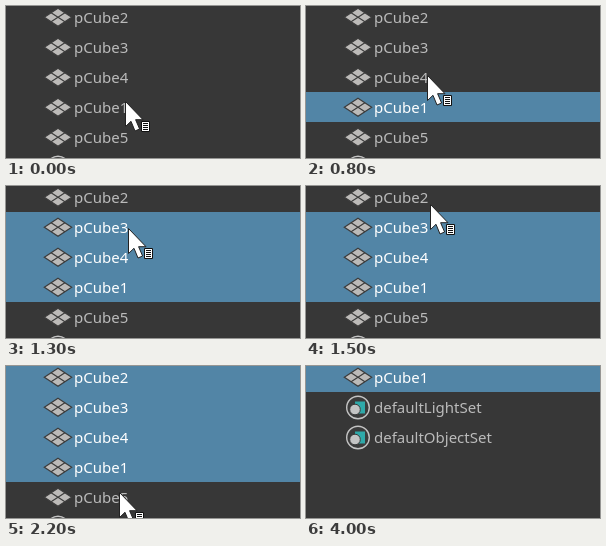
An HTML page that plays this animation: 294 by 152 pixels, repeating every 5800 ms.

```html
<!DOCTYPE html>
<html lang="en">
<head>
<meta charset="utf-8">
<title>Outliner selection</title>
<style>
html, body { margin: 0; width: 100%; height: 100%; overflow: hidden; background: #373737; }
svg { display: block; width: 100%; height: 100%; }
text { font: 15px "Noto Sans", "Open Sans", sans-serif; fill: #bbb; }
.bar { fill: none; }
.on .bar { fill: #5285a6; }
.on text { fill: #fff; }
</style>
</head>
<body>
<svg viewBox="0 0 294 152">
  <defs>
    <g id="mesh" stroke="#3c3c3c" stroke-width="1.2">
      <path d="M52 2.3L65.7 11.3L52 20.3L38.3 11.3Z" fill="#bcbab8"/>
      <path d="M45.1 6.8L58.9 15.8M58.9 6.8L45.1 15.8"/>
    </g>
    <g id="set">
      <circle cx="52" cy="11.5" r="11.3" fill="#3b3b3b" stroke="#c4c4c4" stroke-width="1.4"/>
      <path d="M49 5.5h10v12h-10z" fill="#2fa9a9"/>
      <circle cx="49" cy="13.5" r="5.3" fill="#c4c4c4" stroke="#3b3b3b"/>
    </g>
  </defs>
  <g id="list"></g>
  <g id="cursor">
    <path d="M.5 .5V25.5L6 20.3L10 30L14.6 28L10.6 18.7H18Z" fill="#fff" stroke="#222"/>
    <path d="M16.5 20.5h8v10h-8z" fill="#fff" stroke="#111"/>
    <path d="M18 22.5h5M18 24.5h5M18 26.5h5M18 28.5h5" stroke="#111"/>
  </g>
</svg>
<script>
const LOOP = 5800, SCROLL = 4000, STEP = 100;
const list = document.getElementById("list");
const cursor = document.getElementById("cursor");

// The pointer travels to each stop, then clicks to select a cube.
const stops = [
  { x: 116, y: 94, travel: 200, click: 400, cube: "pCube1" },
  { x: 121, y: 69, travel: 400, click: 900, cube: "pCube4" },
  { x: 122, y: 42, travel: 200, click: 1300, cube: "pCube3" },
  { x: 124, y: 18, travel: 200, click: 1800, cube: "pCube2" },
  { x: 113, y: 126, travel: 400, click: 2300, cube: "pCube5" },
  { x: 225, y: 162, travel: 200, click: 2500 }
];
const start = { x: 119, y: 95, click: 0 };

const cubes = [..."23415"].map(n => "pCube" + n);
const before = [...cubes, ""];
const after = ["pCube1", "defaultLightSet", "defaultObjectSet"];

const selected = (label, t) => stops.some(s => s.cube === label && t >= s.click);

const row = (label, i, t) =>
  `<g transform="translate(0 ${i * 30})" class="${selected(label, t) ? "on" : ""}">
    <rect class="bar" y="-4" width="294" height="30"/>
    <use href="#${cubes.includes(label) ? "mesh" : "set"}"/>
    <text x="68" y="17">${label}</text></g>`;

function moveCursor(t) {
  const n = stops.findIndex(s => t < s.click);
  cursor.style.display = n < 0 ? "none" : "";
  if (n < 0) return;
  const from = stops[n - 1] || start, to = stops[n];
  const k = Math.min(1, (t - from.click) / to.travel);
  const mix = axis => Math.round(from[axis] + (to[axis] - from[axis]) * k);
  cursor.setAttribute("transform", `translate(${mix("x")} ${mix("y")})`);
}

let shown = -1;
function draw(now) {
  const t = Math.floor(now % LOOP / STEP) * STEP;
  if (t !== shown) {
    shown = t;
    const rows = t < SCROLL ? before : after;
    list.innerHTML = rows.map((label, i) => row(label, i, t)).join("");
    moveCursor(t);
  }
  requestAnimationFrame(draw);
}
draw(performance.now());
</script>
</body>
</html>
```
